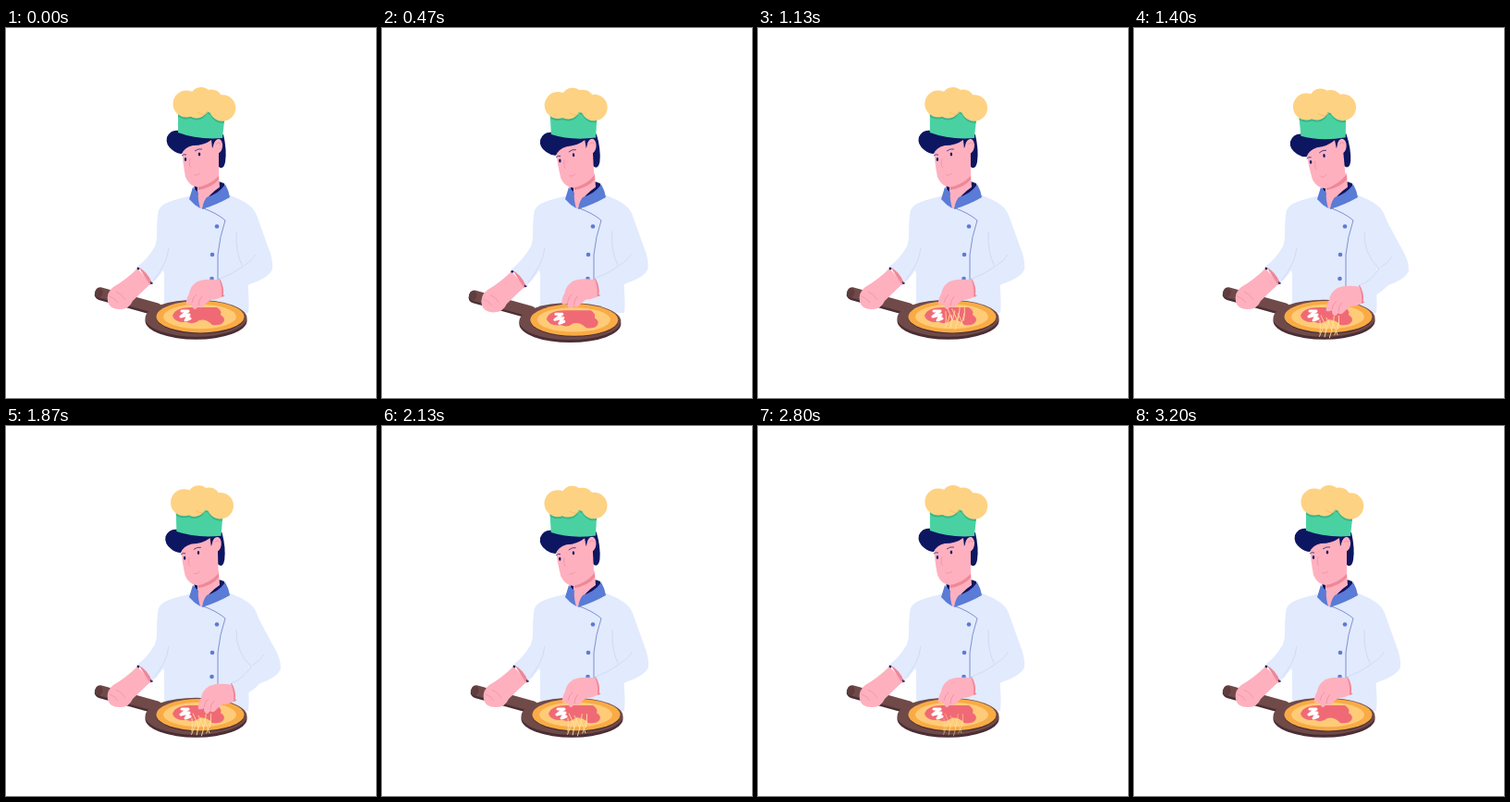
An HTML page with a canvas for the animation above (3270 ms loop, 400 by 400 pixels).

```html
<!DOCTYPE html>
<html lang="en">
<head>
<meta charset="utf-8">
<title>Pizza chef</title>
<style>
html, body { margin: 0; width: 100%; height: 100%; overflow: hidden; background: #fff; }
canvas { display: block; width: 100vmin; height: 100vmin; }
</style>
</head>
<body>
<canvas id="stage"></canvas>
<script>
const canvas = document.getElementById('stage');
const ctx = canvas.getContext('2d');
const SIZE = 400, LOOP = 3270, STEP = LOOP / 49;
const C = {
  coat: '#e2eafd', fold: '#cbd8f8', line: '#7188cc', collar: '#5a7bd6',
  navy: '#0d1660', skin: '#feb0bf', blush: '#ef8797', puff: '#fed283',
  puffLine: '#f3bd67', band: '#4ad1a2', bandDark: '#36b68a',
  wood: '#704a48', woodDark: '#4a2e35', crust: '#f9ab45',
  cheese: '#ffcb78', sauce: '#f06a75', white: '#ffffff', shred: '#ffdf9c'
};
const HEAD_TILT = 0.163;
// Times of alternating upright and tilted head poses.
const NODS = [310, 720, 1170, 1590, 1970, 2390, 2830];
const SHAKES = [720, 1150, 1635, 2125];

const clamp = v => Math.max(0, Math.min(1, v));
const ease = u => (1 - Math.cos(Math.PI * clamp(u))) / 2;
const bump = u => Math.sin(Math.PI * clamp(u)) ** 2;
const part = (t, a, b) => clamp((t - a) / (b - a));

function fill(d, color) {
  ctx.fillStyle = color;
  ctx.fill(new Path2D(d));
}

function stroke(d, color, width) {
  ctx.strokeStyle = color;
  ctx.lineWidth = width;
  ctx.stroke(new Path2D(d));
}

function oval(x, y, rx, ry, color, turn = 0) {
  ctx.fillStyle = color;
  ctx.beginPath();
  ctx.ellipse(x, y, rx, ry, turn, 0, Math.PI * 2);
  ctx.fill();
}

function moved(x, y, draw) {
  ctx.save();
  ctx.translate(x, y);
  draw();
  ctx.restore();
}

function headTurn(t) {
  for (let i = 0; i < NODS.length - 1; i++) {
    if (t >= NODS[i] && t < NODS[i + 1]) {
      const e = ease(part(t, NODS[i], NODS[i + 1]));
      return i % 2 ? 1 - e : e;
    }
  }
  return 0;
}

function armReach(t) {
  return SHAKES.slice(1).reduce((sum, end, i) => sum + bump(part(t, SHAKES[i], end)), 0);
}

function panShift(t) {
  const u = part(t, 320, 1140);
  return { x: -7.6 * bump(u), y: -4 * bump(u) + 5.5 * Math.sin(2 * Math.PI * u) ** 2 };
}

function drawTorso() {
  fill('M201 181C185 185 169 188 165 197C161 215 164 245 171 265L171 308L262 308C264 292 260 275 262 262L271 203C267 192 256 186 240 180Z', C.coat);
  stroke('M211 194Q228 200 237 208Q231 225 229 245L229 280', C.line, 0.9);
  for (const [x, y] of [[228, 214.5], [223, 245], [222.5, 271]]) oval(x, y, 2.3, 2.3, C.collar);
  fill('M203 169Q217 161 236 168L237 174L215 188L205 180Z', C.navy);
  fill('M207 168L230 157L231 172Q219 180 214 190L211 196L207 188Z', C.skin);
  fill('M208 169L230 159L230 164Q222 173 208 175Z', C.blush);
  fill('M202 172L198 185Q203 191 210 195Q207 185 208 178Z', C.collar);
  fill('M212 196Q213 188 217 183Q230 179 237 169Q241 176 242 183Q228 191 212 196Z', C.collar);
}

function drawHat() {
  const band = 'M186 86L186 113Q207 121 234 119L237 92Z';
  const lumps = [[195, 82, 14.5], [211, 76.5, 12.5], [206, 85, 12.5], [222, 79, 12.5], [234, 86.5, 14.3]];
  fill(band, C.band);
  ctx.save();
  ctx.clip(new Path2D(band));
  for (const [x, y, r] of lumps) oval(x, y + 2, r, r, C.bandDark);
  ctx.restore();
  for (const [x, y, r] of lumps) oval(x, y, r, r, C.puff);
  stroke('M207 91Q215 96 218 91', C.puffLine, 0.9);
}

function drawHead(turn) {
  ctx.save();
  ctx.translate(223, 174);
  ctx.rotate(-HEAD_TILT * turn);
  ctx.translate(-223, -174);
  fill('M220 116L235 115Q239 132 237 145Q235 154 230 150L222 136Z', C.navy);
  fill('M190 128Q191 146 194 161Q198 171 207 172Q220 170 230 160L230 125L212 116Z', C.skin);
  fill('M188 111Q178 109 174 118Q172 126 180 132Q185 136 190 136Q193 129 202 127Q214 127 222 121L223 130L227 122Q231 119 235 119L234 116Q211 111 188 111Z', C.navy);
  oval(229, 128, 5, 8, C.skin, 0.15);
  stroke('M227 126Q230 122 232 126', C.blush, 0.8);
  oval(194, 142, 1.2, 2, C.navy);
  oval(209, 136.5, 1.2, 2, C.navy);
  stroke('M190 138Q192 136 195 137M204 133Q208 130 212 131', C.navy, 0.7);
  stroke('M199 141Q197 149 200 151M203 159Q207 160 210 157', C.blush, 0.6);
  drawHat();
  ctx.restore();
}

function drawPan() {
  ctx.lineCap = 'round';
  stroke('M102 288L163 305', C.woodDark, 12.5);
  stroke('M102 286L163 303', C.wood, 11.5);
  oval(100.5, 286, 4, 5.2, '#5f3c3e', 0.2);
  oval(205.5, 316.5, 55, 20.2, C.woodDark);
  oval(205.5, 313.7, 55, 20, C.wood);
  oval(210, 313.2, 47.5, 17.3, C.woodDark);
  oval(210, 312.2, 47.5, 17.2, C.crust);
  oval(209.5, 312, 39.5, 13.2, C.cheese);
  fill('M180 311Q183 302 200 302L228 302Q234 306 232 310Q238 314 235 318Q232 322 223 321Q216 314 209 316Q203 321 196 318Q182 319 180 311Z', C.sauce);
  stroke('M190 306L197 306L189 312L198 310L194 316L199 314', C.white, 3);
}

function drawCheese(t) {
  if (t < 1000 || t > 2950) return;
  const drop = part(t, 1000, 1270) ** 1.4;
  ctx.save();
  ctx.globalAlpha = part(t, 1000, 1080) * (1 - part(t, 2700, 2950));
  ctx.translate(214 - 3 * drop, 308 + 15 * drop);
  for (let i = 0; i < 11; i++) {
    const x = (i - 5) * 2, y = Math.sin(i * 2.4) * 5;
    const lean = Math.sin(i * 4.1) * 3;
    stroke(`M${x - lean} ${y - 7}Q${x + 1} ${y} ${x + lean} ${y + 7}`, C.shred, 0.9);
  }
  ctx.restore();
}

function drawLeftArm(p) {
  const at = (x, y) => `${x + p.x} ${y + p.y}`;
  moved(p.x, p.y, () => {
    fill('M142 260L157 276Q146 286 137 295Q133 304 124 304Q113 305 110 296Q108 286 116 280Q130 272 142 260Z', C.skin);
    stroke('M112 290Q118 292 121 297M119 285Q126 288 129 294', C.blush, 0.6);
    fill('M143 258L151 260L159 274L156 278Z', C.blush);
    oval(143, 260, 1.4, 1.4, C.navy);
    oval(157.5, 275.5, 1.4, 1.4, C.navy);
  });
  fill(`M167 194C162 210 165 226 161 236Q154 249 ${at(142, 258)}Q${at(153, 263)} ${at(158, 276)}Q169 266 175 252L181 210Z`, C.coat);
  stroke(`M176 238Q174 255 ${at(160, 272)}`, C.fold, 0.8);
}

function drawRightArm(k) {
  const h = (x, y) => `${x + 13 * k} ${y + 7 * k}`;
  const e = (x, y) => `${x + 9 * k} ${y + 2 * k}`;
  const upper = `${283 + 5 * k} 236`;
  moved(13 * k, 7 * k, () => {
    fill('M232 273Q217 270 207 274Q199 279 198 287Q194 294 195 299Q199 300 201 298Q201 304 205 304L208 301Q211 304 214 300Q218 296 221 294Q229 294 236 289Z', C.skin);
    stroke('M201 297Q202 291 206 288M208 300Q208 294 212 290', C.blush, 0.7);
    fill('M230 271L234 271Q238 281 236 290L233 291Q234 280 230 271Z', C.blush);
  });
  fill(`M252 187C264 189 270 198 273 208L${upper}Q${e(289, 250)} ${e(288, 261)}Q${e(284, 270)} ${e(266, 276)}Q${h(250, 283)} ${h(235, 289)}Q${h(236, 279)} ${h(231, 271)}Q${h(242, 266)} ${e(254, 259)}Q250 240 247 220Z`, C.coat);
  stroke(`M249 220Q248 244 ${e(256, 258)}Q${h(243, 267)} ${h(231, 271)}`, C.fold, 0.9);
  stroke(`M${e(257, 257)}Q${e(266, 252)} ${e(270, 245)}`, C.fold, 0.8);
}

function draw(t) {
  const pan = panShift(t);
  ctx.fillStyle = C.white;
  ctx.fillRect(0, 0, SIZE, SIZE);
  ctx.lineJoin = 'round';
  drawTorso();
  drawHead(headTurn(t));
  moved(pan.x, pan.y, () => {
    drawPan();
    drawCheese(t);
  });
  drawLeftArm(pan);
  moved(pan.x * 0.2, pan.x * 0.2, () => drawRightArm(armReach(t)));
}

function fit() {
  const scale = Math.min(innerWidth, innerHeight) / SIZE * (devicePixelRatio || 1);
  canvas.width = canvas.height = Math.round(SIZE * scale);
  ctx.setTransform(scale, 0, 0, scale, 0, 0);
}

const start = performance.now();
function tick() {
  const t = (performance.now() - start) % LOOP;
  // The motion runs at fifteen poses a second.
  draw(Math.floor((t + 5) / STEP) % 49 * STEP);
  requestAnimationFrame(tick);
}

addEventListener('resize', fit);
fit();
tick();
</script>
</body>
</html>
```
